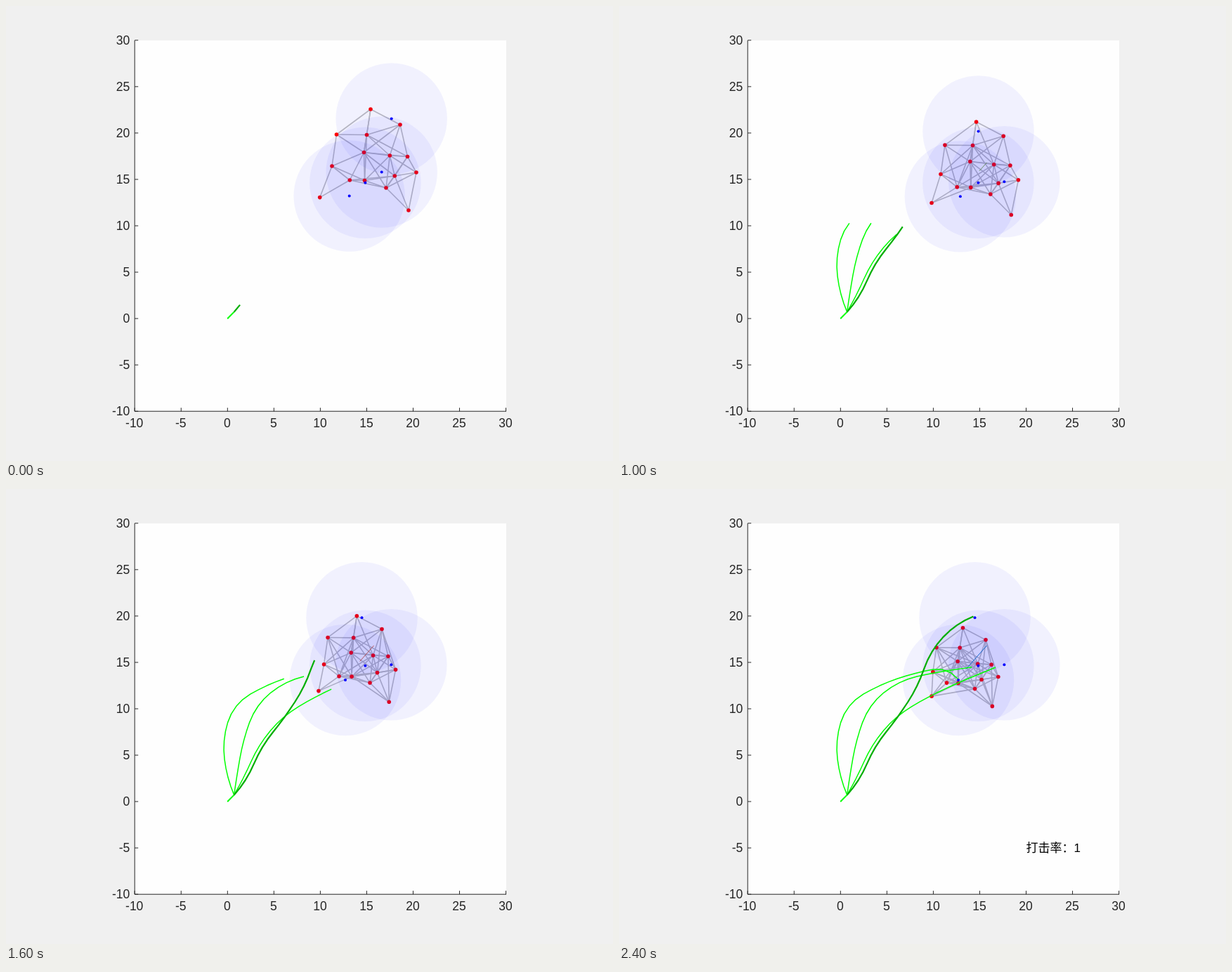
An HTML page with a canvas for the animation above (2.9 s loop, 864x648 px).

```html
<!DOCTYPE html>
<html lang="zh-CN">
<head>
<meta charset="utf-8">
<style>
  html, body { margin: 0; width: 100%; height: 100%; overflow: hidden; background: #f0f0f0; }
  canvas { display: block; }
</style>
</head>
<body>
<canvas width="864" height="648"></canvas>
<script>
const ctx = document.querySelector('canvas').getContext('2d');
const LOOP = 2900, STEP = 100, LAST = 24;
const UNIT = 13.21, LINK = 5 * UNIT, RANGE = 6 * UNIT;
const LEFT = 183.2, BOTTOM = 577.2, INK = '#262626';

// The swarm starts here, then drifts while shrinking about its centre
const agents = [
  [519, 147], [561, 169], [470.5, 183], [513.5, 183.5], [509.5, 208.5],
  [546.3, 213], [571.5, 214.5], [584, 237], [553.3, 242], [541, 259],
  [510.5, 248.5], [489.3, 248], [464, 228], [573, 291], [446.7, 272.6]
];
const HUB = [529, 219.5], DRIFT = [-31.8, 34.5], SHRINK = .225, WALL = 445;
const driftColors = ['#edb120', '#edb120', '#77ac30', '#77ac30', '#d95319', '#a2142f', '#0072bd'];

// Targets wander through one point per four steps, then rest
const targets = [
  [[488.7, 270.6], [488.7, 270.6], [488.7, 270.6], [483, 272]],
  [[511.4, 251.8]],
  [[534.7, 236.6], [540, 236.4], [548.4, 250.2]],
  [[548.7, 160.5], [523.6, 171.2], [516.5, 173.9], [506.5, 183.2]]
];

// Pursuers move one unit per step; headings in degrees, one per four steps
const pursuers = [
  { headings: [113, 97, 73, 30, 19, 10, -72], steps: 23 },
  { headings: [82, 80, 70, 39, 13, 8, 8], steps: 22 },
  { headings: [60, 66, 50, 31, 25, 22, 23], steps: 22 }
];
const leader = { headings: [48, 67, 51, 57, 71, 47, 22], steps: 24 };
const FORK = [Math.SQRT1_2, Math.SQRT1_2];

const toStage = ([x, y]) => [LEFT + (x + 10) * UNIT, BOTTOM - (y + 10) * UNIT];
const at = (list, i) => list[Math.min(list.length - 1, i)];
const mix = (a, b, f) => a + (b - a) * f;

function stroke(points, color, width) {
  ctx.beginPath();
  points.forEach(p => ctx.lineTo(...p));
  ctx.strokeStyle = color;
  ctx.lineWidth = width;
  ctx.stroke();
}

function disc([x, y], r, color) {
  ctx.beginPath();
  ctx.arc(x, y, r, 0, 2 * Math.PI);
  ctx.fillStyle = color;
  ctx.fill();
}

function label(text, x, y, align) {
  ctx.textAlign = align;
  ctx.fillText(text, x, y);
}

function wander(path, step) {
  const i = Math.floor(step / 4), a = at(path, i), b = at(path, i + 1);
  return a.map((v, k) => mix(v, b[k], step / 4 - i));
}

function trail({ headings, steps }, count) {
  let [x, y] = FORK;
  const points = [FORK];
  for (let s = 0; s < Math.min(count, steps); s++) {
    const u = (s + .5) / 4, i = Math.floor(u);
    const angle = mix(headings[i], headings[i + 1], u - i) * Math.PI / 180;
    points.push([x += Math.cos(angle), y += Math.sin(angle)]);
  }
  return points;
}

function swarm(step) {
  const u = step / LAST, s = u + u * (1 - u) * (1.03 * u - .69);
  return agents.map(p => {
    const [x, y] = p.map((v, k) => v + s * (DRIFT[k] - SHRINK * (v - HUB[k])));
    return [Math.max(WALL, x), y];
  });
}

const center = points => [0, 1].map(k => points.reduce((sum, p) => sum + p[k], 0) / points.length);

function drawAxes() {
  ctx.fillStyle = '#f0f0f0';
  ctx.fillRect(0, 0, 864, 648);
  ctx.fillStyle = '#fefefe';
  ctx.fillRect(183, 49, 529, 528);
  ctx.fillStyle = INK;
  ctx.font = '17.5px "Liberation Sans", Arial, sans-serif';
  stroke([[LEFT, 49], [LEFT, BOTTOM], [712, BOTTOM]], INK, 1);
  for (let v = -10; v <= 30; v += 5) {
    const [x, y] = toStage([v, v]);
    stroke([[x, BOTTOM], [x, BOTTOM - 5]], INK, 1);
    stroke([[LEFT, y], [LEFT + 5, y]], INK, 1);
    label(v, x - .5, 599.7, 'center');
    label(v, 176.3, y + 6, 'right');
  }
}

function draw(step) {
  const nodes = swarm(step);
  const spots = targets.map(path => wander(path, step));
  drawAxes();
  nodes.forEach((a, i) => nodes.slice(i + 1).forEach(b => {
    if (Math.hypot(a[0] - b[0], a[1] - b[1]) < LINK) stroke([a, b], '#bebebe', 1.6);
  }));
  stroke([center(agents), center(nodes)], driftColors[Math.floor(step / 4)], .9);
  nodes.forEach(p => disc(p, 2.8, '#f00'));
  spots.forEach(p => disc(p, RANGE, 'rgba(0,0,255,.05)'));
  spots.forEach(p => disc(p, 2, '#00f'));
  pursuers.forEach(p => stroke([[0, 0], ...trail(p, step)].map(toStage), '#0f0', 1.5));
  stroke(trail(leader, step + 1).map(toStage), '#00ae00', 2.2);
  if (step === LAST) {
    ctx.fillStyle = '#000';
    ctx.font = '17px "Liberation Sans", "Noto Sans CJK SC", "Noto Sans CJK", sans-serif';
    label('打击率：1', 579.5, 517, 'left');
  }
}

ctx.lineJoin = 'round';
const begin = performance.now();
function tick() {
  const t = (performance.now() - begin) % LOOP;
  draw(Math.min(LAST, Math.floor(t / STEP)));
  requestAnimationFrame(tick);
}
tick();
</script>
</body>
</html>
```
